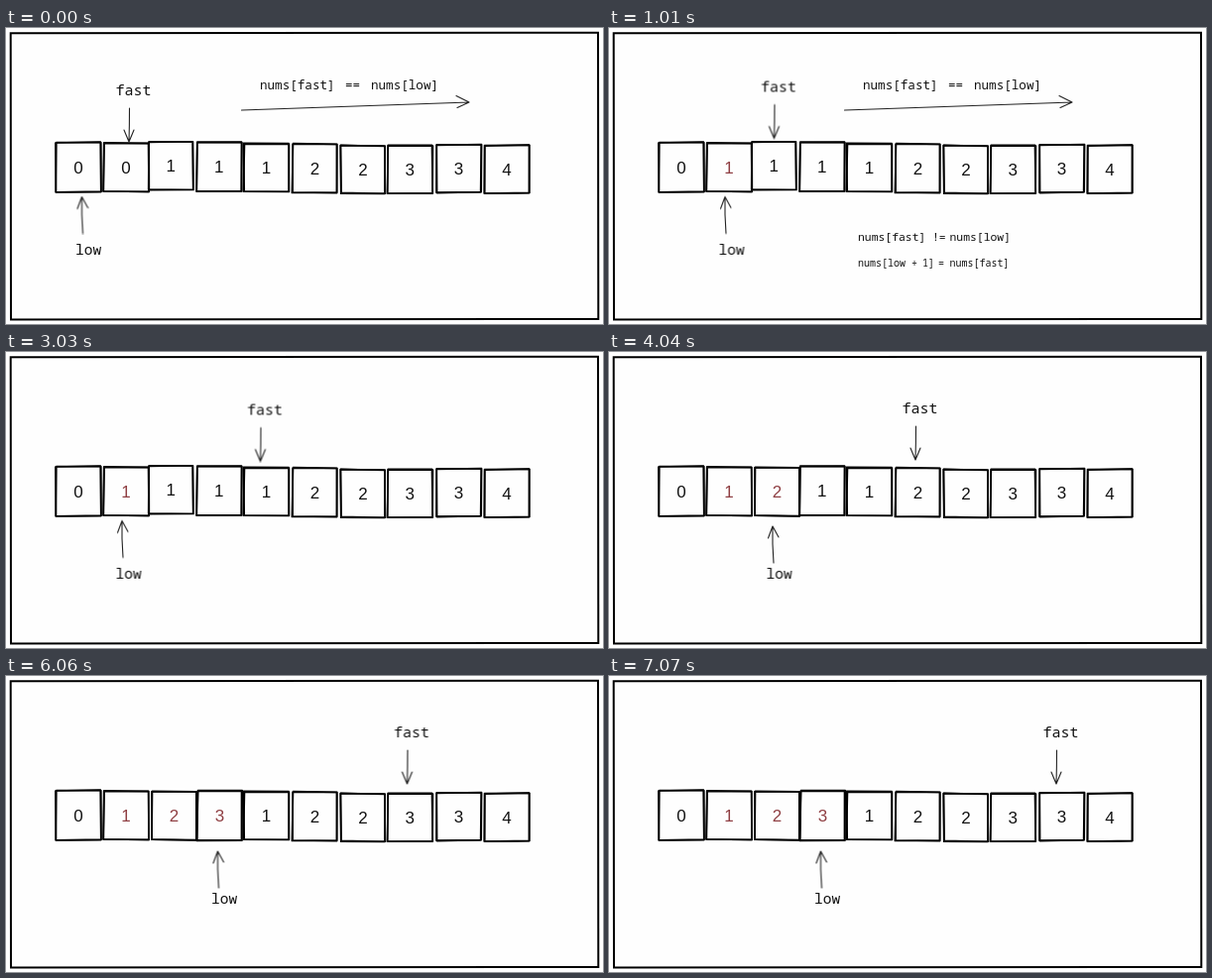
An HTML page that plays this animation: 602x299 px, repeating every 8 s.

```html
<!DOCTYPE html>
<html lang="en">
<head>
<meta charset="utf-8">
<title>Two pointers</title>
<style>
  html, body { margin: 0; width: 100%; height: 100%; overflow: hidden; background: #fefefe; }
  svg { display: block; width: 100%; height: 100%; }
  text { fill: #111; white-space: pre; }
  .note { font-family: "Noto Sans Mono", monospace; }
  .digit { font: 17px "Liberation Sans", Arial, sans-serif; text-anchor: middle; }
  .new { fill: #8f3f43; }
  .line { fill: none; stroke: #222; stroke-width: 1.1; stroke-linecap: round; stroke-linejoin: round; }
  .box { fill: none; stroke: #000; stroke-width: 1.7; stroke-linejoin: round; }

  #fast, #low, [data-show] { animation: 8s step-end infinite; }
  #fast { animation-name: fast; }
  #low { animation-name: low; }
  [data-show="to1"] { animation-name: to1; }
  [data-show="from1"] { animation-name: from1; }
  [data-show="only1"] { animation-name: only1; }
  [data-show="to2"] { animation-name: to2; }
  [data-show="to4"] { animation-name: to4; }
  [data-show="from4"] { animation-name: from4; }
  [data-show="to6"] { animation-name: to6; }
  [data-show="from6"] { animation-name: from6; }

  /* one step lasts 1010 ms = 12.625 % */
  @keyframes fast {
    0% { transform: translate(124px, 115px); }
    12.625% { transform: translate(166.5px, 111.5px); }
    25.25% { transform: translate(207px, 111px); }
    37.875% { transform: translate(256.5px, 110.5px); }
    50.5% { transform: translate(309px, 109px); }
    63.125% { transform: translate(355px, 109px); }
    75.75% { transform: translate(404.5px, 109px); }
    88.375%, 100% { transform: translate(451px, 109px); }
  }
  @keyframes low {
    0% { transform: translate(76.5px, 170.5px); }
    12.625% { transform: translate(117px, 170.5px); }
    50.5% { transform: translate(165px, 176px); }
    75.75%, 100% { transform: translate(213.5px, 177px); }
  }
  /* the label hangs lower while the pointer is at its first cells */
  #low text { animation: label 8s step-end infinite; }
  @keyframes label {
    0% { transform: translateY(58.5px); }
    50.5%, 100% { transform: translateY(53px); }
  }
  @keyframes to1 { 0% { opacity: 1; } 12.625%, 100% { opacity: 0; } }
  @keyframes from1 { 0% { opacity: 0; } 12.625%, 100% { opacity: 1; } }
  @keyframes only1 { 0% { opacity: 0; } 12.625% { opacity: 1; } 25.25%, 100% { opacity: 0; } }
  @keyframes to2 { 0% { opacity: 1; } 25.25%, 100% { opacity: 0; } }
  @keyframes to4 { 0% { opacity: 1; } 50.5%, 100% { opacity: 0; } }
  @keyframes from4 { 0% { opacity: 0; } 50.5%, 100% { opacity: 1; } }
  @keyframes to6 { 0% { opacity: 1; } 75.75%, 100% { opacity: 0; } }
  @keyframes from6 { 0% { opacity: 0; } 75.75%, 100% { opacity: 1; } }
</style>
</head>
<body>
<svg viewBox="0 0 602 299" preserveAspectRatio="none">
  <path d="M4.7 5.2 L597 4.7 L597.3 294 L5 294.5 Z" fill="none" stroke="#000" stroke-width="2"/>
  <g id="cells"></g>

  <g data-show="to2">
    <path class="line" d="M237.5 83 Q350 79 467 75 M454 68.5 L467 75 L455 80.5"/>
    <text class="note" font-size="12.6" y="62"><tspan x="256">nums[fast]</tspan><tspan x="342">==</tspan><tspan x="368">nums[low]</tspan></text>
  </g>

  <g class="note" data-show="only1">
    <text font-size="11.4" y="214.5"><tspan x="251">nums[fast]</tspan><tspan x="326">!=</tspan><tspan x="343.5">nums[low]</tspan></text>
    <text font-size="10" y="240.5"><tspan x="251">nums[low</tspan><tspan x="305">+</tspan><tspan x="316">1]</tspan><tspan x="332">=</tspan><tspan x="343.5">nums[fast]</tspan></text>
  </g>

  <g id="fast">
    <path class="line" d="M.5 -34 Q.5 -17 0 0 M-5 -12 L0 0 L5 -12"/>
    <text class="note" font-size="15" x="-13.5" y="-47.5">fast</text>
  </g>
  <g id="low">
    <path class="line" d="M1 37 Q-.5 18 0 0 M-4.5 12 L0 0 L6 11"/>
    <text class="note" font-size="14.5" x="-6.5">low</text>
  </g>
</svg>
<script>
  const NS = "http://www.w3.org/2000/svg";
  const cells = document.getElementById("cells");

  let seed = 7;
  const jitter = () => {
    seed = (seed * 16807) % 2147483647;
    return (seed / 2147483647 - 0.5) * 1.2;
  };

  function add(parent, tag, attrs, content = "") {
    const el = document.createElementNS(NS, tag);
    for (const key in attrs) el.setAttribute(key, attrs[key]);
    el.textContent = content;
    return parent.appendChild(el);
  }

  function sketchBox(parent, x, y, w, h) {
    const corners = [[x, y], [x + w, y], [x + w, y + h], [x, y + h]];
    for (let pass = 0; pass < 2; pass++) {
      const points = corners.map(([a, b]) => `${a + jitter()} ${b + jitter()}`);
      add(parent, "path", { class: "box", d: `M${points.join("L")}Z` });
    }
  }

  const group = show => add(cells, "g", show ? { "data-show": show } : {});
  const digit = (parent, value, x, y, isNew) =>
    add(parent, "text", { class: isNew ? "digit new" : "digit", x, y }, value);

  function cell(value, x, y, h, show, isNew) {
    const g = group(show);
    sketchBox(g, x, y, 45, h);
    digit(g, value, x + 22.5, y + h / 2 + 6, isNew);
  }

  cell(0, 50.5, 115.5, 50);
  sketchBox(group(), 98.5, 116.5, 45, 48.5);
  digit(group("to1"), 0, 121, 146.5);
  digit(group("from1"), 1, 121, 146.5, true);
  cell(1, 143.8, 115, 48.5, "to4");
  cell(2, 147, 117, 48.5, "from4", true);
  cell(1, 192.3, 115.5, 49.5, "to6");
  cell(3, 193, 116, 50, "from6", true);
  cell(1, 240, 117, 48.5);
  cell(2, 289, 117, 49);
  cell(2, 337.5, 119, 48);
  cell(3, 384.8, 118.5, 48.5);
  cell(3, 434, 118, 48);
  cell(4, 482.5, 118.5, 48.5);
</script>
</body>
</html>
```
